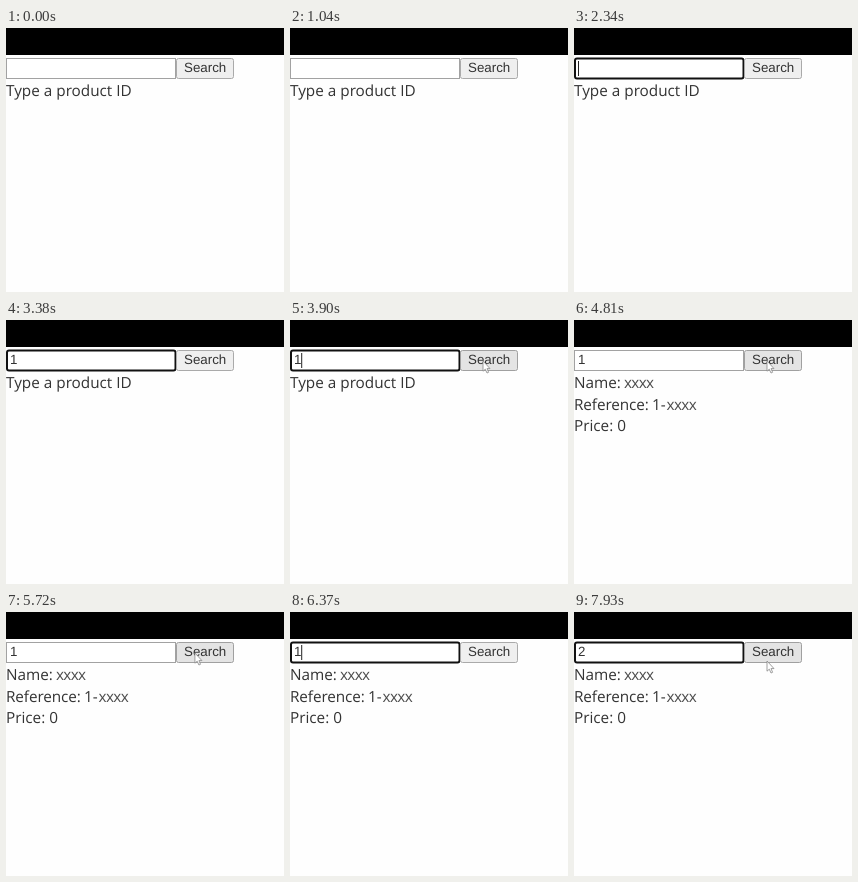
An HTML page for the animation above (8000 ms loop, 278 by 264 pixels).

```html
<!DOCTYPE html>
<html lang="en">
<head>
<meta charset="utf-8">
<title>Product search</title>
<style>
  html, body { margin: 0; width: 100%; height: 100%; overflow: hidden; background: #fefefe; }
  svg { display: block; width: 100%; height: 100%; text-rendering: geometricPrecision; }
  .ui { font: 13.33px "Liberation Sans", Arial, sans-serif; fill: #333; }
  .page { font: 15.3px "Open Sans", "Noto Sans", sans-serif; fill: #333; }
  .value { fill: #4c4c4c; letter-spacing: -.65px; }
</style>
</head>
<body>
<svg viewBox="0 0 278 264">
  <rect width="278" height="264" fill="#fefefe"/>
  <rect width="278" height="27"/>
  <rect id="field" fill="#fff"/>
  <text id="query" class="ui" x="4" y="44.2"></text>
  <rect id="caret" y="33" width="1" height="15" fill="#222"/>
  <rect id="button" x="170.5" y="30.5" width="57" height="20" rx="2"/>
  <text class="ui" x="178" y="44.2">Search</text>
  <text id="hint" class="page" x="0" y="68">Type a product ID</text>
  <g id="result" class="page">
    <text x="0" y="68">Name:</text>
    <text class="value" x="50" y="68">xxxx</text>
    <text x="0" y="89.6" letter-spacing="-.1">Reference:</text>
    <text x="78" y="89.6">1-</text>
    <text class="value" x="92.6" y="89.6">xxxx</text>
    <text x="0" y="110.9">Price: 0</text>
  </g>
  <path id="pointer" d="M0 0V10.2L2.3 8.2L4 12L5.6 11.3L4 7.6H7Z" fill="#fff" stroke="#888" stroke-width=".8" stroke-linejoin="round"/>
</svg>
<script>
const LOOP = 8000;
const $ = id => document.getElementById(id);
const show = (id, on) => $(id).setAttribute('visibility', on ? 'visible' : 'hidden');
const set = (id, attrs) => {
  for (const k in attrs) $(id).setAttribute(k, attrs[k]);
};
const within = (t, spans) => spans.some(([a, b]) => t >= a && t < b);

const focusSpans = [[1100, 4160], [6240, LOOP]];
const caretSpans = [[1100, 1690], [2340, 2990], [3510, 4160], [6240, 6760], [6890, 7670]];
const typed = [[0, ''], [2600, '1'], [6890, ''], [7150, '2']];

// Pointer stops: time, x, y. Over the field it is not drawn.
const path = [
  [3250, 163, 46], [3420, 172, 45], [3650, 187, 42], [3900, 193, 41],
  [5590, 193, 41], [5720, 189, 41], [5850, 178, 41], [5980, 163, 42],
  [7600, 160, 42], [7760, 173, 45], [7930, 193, 49], [LOOP, 194, 49]
];

function pointerAt(t) {
  if (t <= path[0][0]) return [path[0][1], path[0][2]];
  const i = path.findIndex(p => p[0] >= t);
  const [t0, x0, y0] = path[i - 1], [t1, x1, y1] = path[i];
  const k = (t - t0) / (t1 - t0);
  return [x0 + (x1 - x0) * k, y0 + (y1 - y0) * k];
}

function draw(t) {
  const focused = within(t, focusSpans);
  set('field', focused
    ? { x: 1, y: 30.5, width: 168.5, height: 20, rx: 2, stroke: '#111', 'stroke-width': 2 }
    : { x: .5, y: 30.5, width: 169, height: 20, rx: 0, stroke: '#a2a2a2', 'stroke-width': 1 });

  const text = typed.filter(e => e[0] <= t).pop()[1];
  $('query').textContent = text;
  set('caret', { x: text ? 11.2 : 4 });
  show('caret', within(t, caretSpans));

  const [x, y] = pointerAt(t);
  const hover = x >= 170;
  const pressed = t >= 4160 && t < 4260;
  set('button', {
    fill: pressed ? '#f5f5f5' : hover ? '#e4e4e4' : '#efefef',
    stroke: hover ? '#a0a0a0' : '#aaa'
  });
  set('pointer', { transform: `translate(${x} ${y})` });
  show('pointer', hover);

  show('hint', t < 4810);
  show('result', t >= 4810);
}

const start = performance.now();
function tick() {
  draw((performance.now() - start) % LOOP);
  requestAnimationFrame(tick);
}
tick();
</script>
</body>
</html>
```
